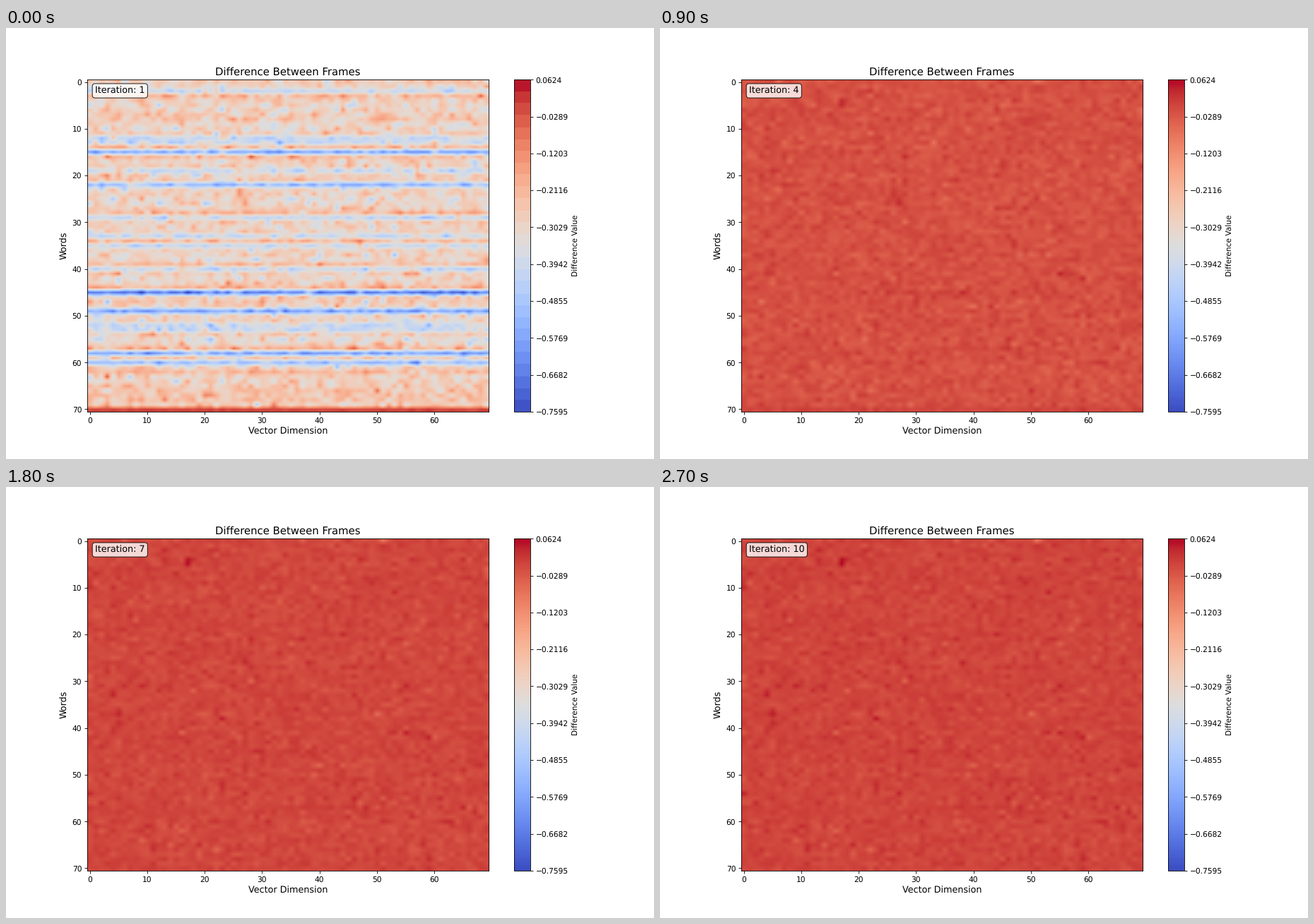
A matplotlib script that plays this animation: 917 px wide and 611 px high, repeating every 3000 ms.

```python
import numpy as np
import matplotlib.pyplot as plt
from matplotlib.animation import FuncAnimation

plt.rcParams["text.hinting"] = "none"

DPI = 76.4
WORDS, DIMS = 71, 70
STEPS, STEP_MS = 10, 300
VMIN, VMAX = -0.75951, 0.06239

rng = np.random.default_rng(7)


def noise_field():
    """Unit noise with slightly heavy tails, so a few cells stand out."""
    return rng.standard_t(9, size=(WORDS, DIMS)) / np.sqrt(9 / 7)


early, late = noise_field(), noise_field()

# Mean first change of each word: most lie near -0.28, some form clear bands.
first_change = rng.normal(-0.28, 0.025, WORDS)
first_change[[3, 14, 28, 34, 44, 57, 62]] = -0.21
first_change[[2, 12, 13, 19, 29, 33, 35, 40, 52, 53]] = -0.40
first_change[[22, 60]] = -0.51
first_change[[15, 49, 58]] = -0.58
first_change[45] = -0.68
first_change = first_change[:, None]


def difference(step):
    if step == 0:
        values = first_change + 0.058 * early
    else:
        decay = 0.6 ** (step - 1)
        values = (-0.05 - 0.04 * (first_change + 0.28)) * decay
        values = values + 0.021 * decay ** 0.6 * early + 0.012 * (1 - 0.75 * decay) * late
    values[-1] = 0.008 * early[-1]  # the last word hardly moves
    return values


def bar_colors(bands):
    position = (np.arange(256) + 0.5) / 256
    stepped = (np.floor(position * bands) + 0.5) / bands
    return (VMIN + stepped * (VMAX - VMIN)).reshape(-1, 1)


fig, ax = plt.subplots(figsize=(917.01 / DPI, 611.01 / DPI), dpi=DPI)
image = ax.imshow(difference(0), cmap="coolwarm", vmin=VMIN, vmax=VMAX,
                  aspect="auto", interpolation="bilinear")
bar = fig.colorbar(image, ax=ax, ticks=np.linspace(VMIN, VMAX, 10),
                   format=lambda value, _: f"{value:.4f}".replace("-", "\u2212"))
bar.set_label("Difference Value")
ax.set_title("Difference Between Frames", fontsize=14)
ax.set_xlabel("Vector Dimension", fontsize=12)
ax.set_ylabel("Words", fontsize=12)
counter = ax.text(0.02, 0.98, "", transform=ax.transAxes, fontsize=12, va="top",
                  bbox=dict(boxstyle="round", facecolor="white", alpha=0.8))


def update(step):
    image.set_data(difference(step))
    # The scale starts in coarse bands and is smooth afterwards.
    bar.solids.set_array(bar_colors(28 if step == 0 else 256))
    counter.set_text(f"Iteration: {step + 1}")
    return image, counter


anim = FuncAnimation(fig, update, frames=STEPS, interval=STEP_MS, repeat=True, repeat_delay=0)
plt.show()
```
